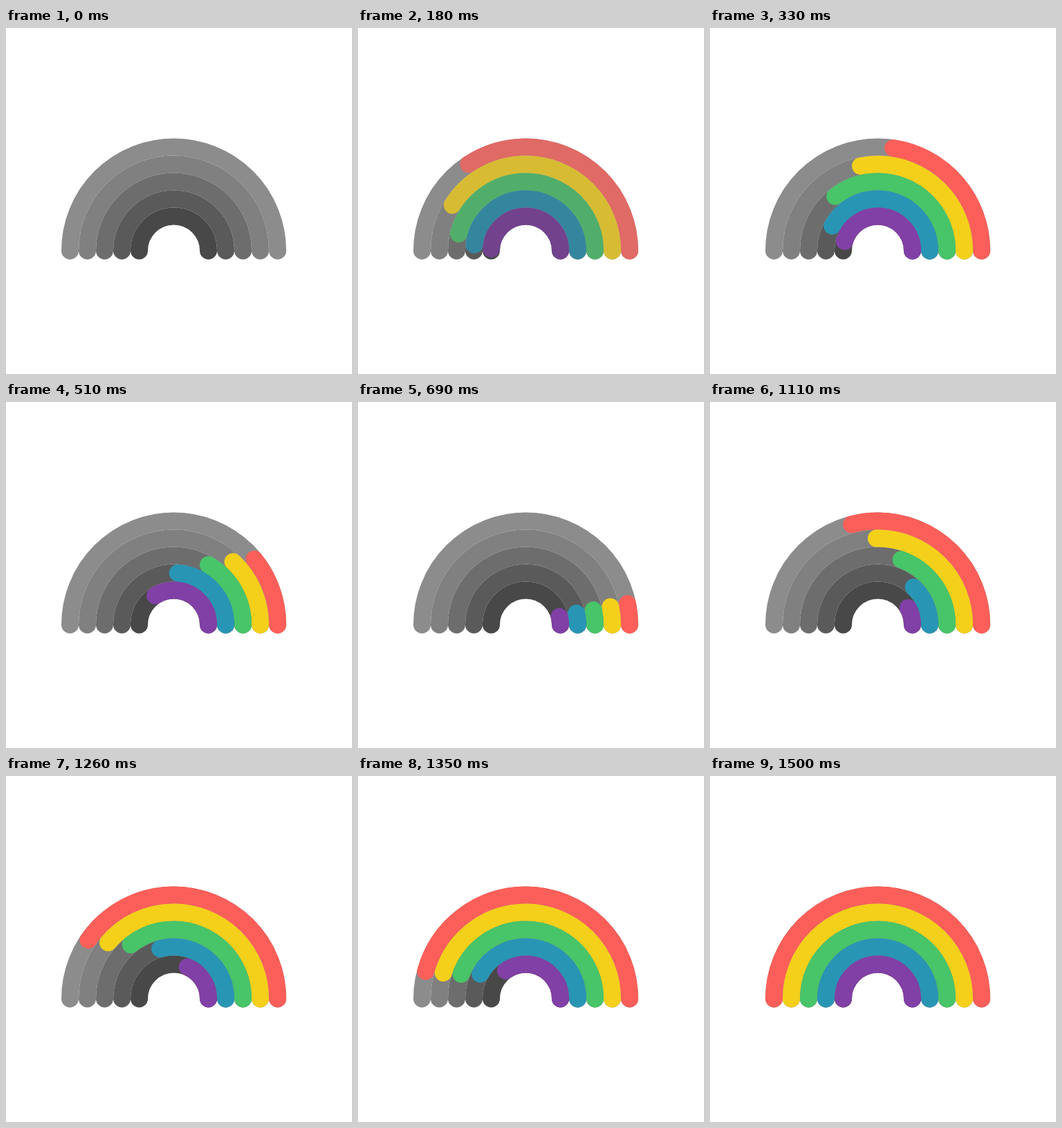
An HTML page for the animation above (1.53 s loop, 500x500 px).

```html
<!DOCTYPE html>
<html lang="en">
<head>
<meta charset="utf-8">
<title>Rainbow loader</title>
<style>
html, body { margin: 0; width: 100%; height: 100%; overflow: hidden; background: #fff; }
svg { display: block; width: 100vw; height: 100vh; }
path { fill: none; stroke-width: 25; stroke-linecap: round; }
</style>
</head>
<body>
<svg viewBox="0 0 500 500"><g id="base"></g><g id="color"></g></svg>
<script>
const LOOP = 1530, STEP = 30, HALF = 750, FADE = 240;
const CX = 242.5, CY = 322, WIDTH = 25, OUTER = 150;
const MIN = .05; // shortest coloured share of an arc

// From the outer band to the inner one.
const grays = ['#8c8c8c', '#808080', '#6d6d6d', '#5a5a5a', '#484848'];
const hues = ['#fc5f59', '#f4d01a', '#48c469', '#2895b5', '#8140a5'];

const base = document.getElementById('base');
const color = document.getElementById('color');

function addArc(parent, r, stroke) {
  const p = document.createElementNS('http://www.w3.org/2000/svg', 'path');
  p.setAttribute('d', `M${CX + r} ${CY}A${r} ${r} 0 0 0 ${CX - r} ${CY}`);
  p.setAttribute('stroke', stroke);
  parent.appendChild(p);
  return p;
}

const bands = hues.map((hue, i) => {
  const r = OUTER - i * WIDTH;
  addArc(base, r, grays[i]);
  return { arc: addArc(color, r, hue), len: Math.PI * r, k: i / (hues.length - 1) };
});

// cubic-bezier(lead, 0, 2/3, 1): a larger lead starts more slowly.
function ease(u, lead) {
  let lo = 0, hi = 1;
  for (let n = 0; n < 24; n++) {
    const s = (lo + hi) / 2, q = 1 - s;
    const x = 3 * lead * s * q * q + 2 * s * s * q + s * s * s;
    if (x < u) lo = s; else hi = s;
  }
  return lo * lo * (3 - 2 * lo);
}

// Each band shrinks, then grows back; inner bands lag behind.
function share(t, k) {
  const n = t < HALF
    ? 1 - ease(t / HALF, k)
    : ease(Math.min(1, t / HALF - 1), .16 + .56 * k + .28 * k * k);
  return MIN + (1 - MIN) * n;
}

function draw(t) {
  color.setAttribute('opacity', Math.min(1, t / FADE));
  for (const { arc, len, k } of bands) {
    arc.setAttribute('stroke-dasharray', `${share(t, k) * len} ${2 * len}`);
  }
}

const start = performance.now();
function tick() {
  const t = (performance.now() - start) % LOOP;
  draw(Math.floor(t / STEP) * STEP);
  requestAnimationFrame(tick);
}
draw(0);
requestAnimationFrame(tick);
</script>
</body>
</html>
```
